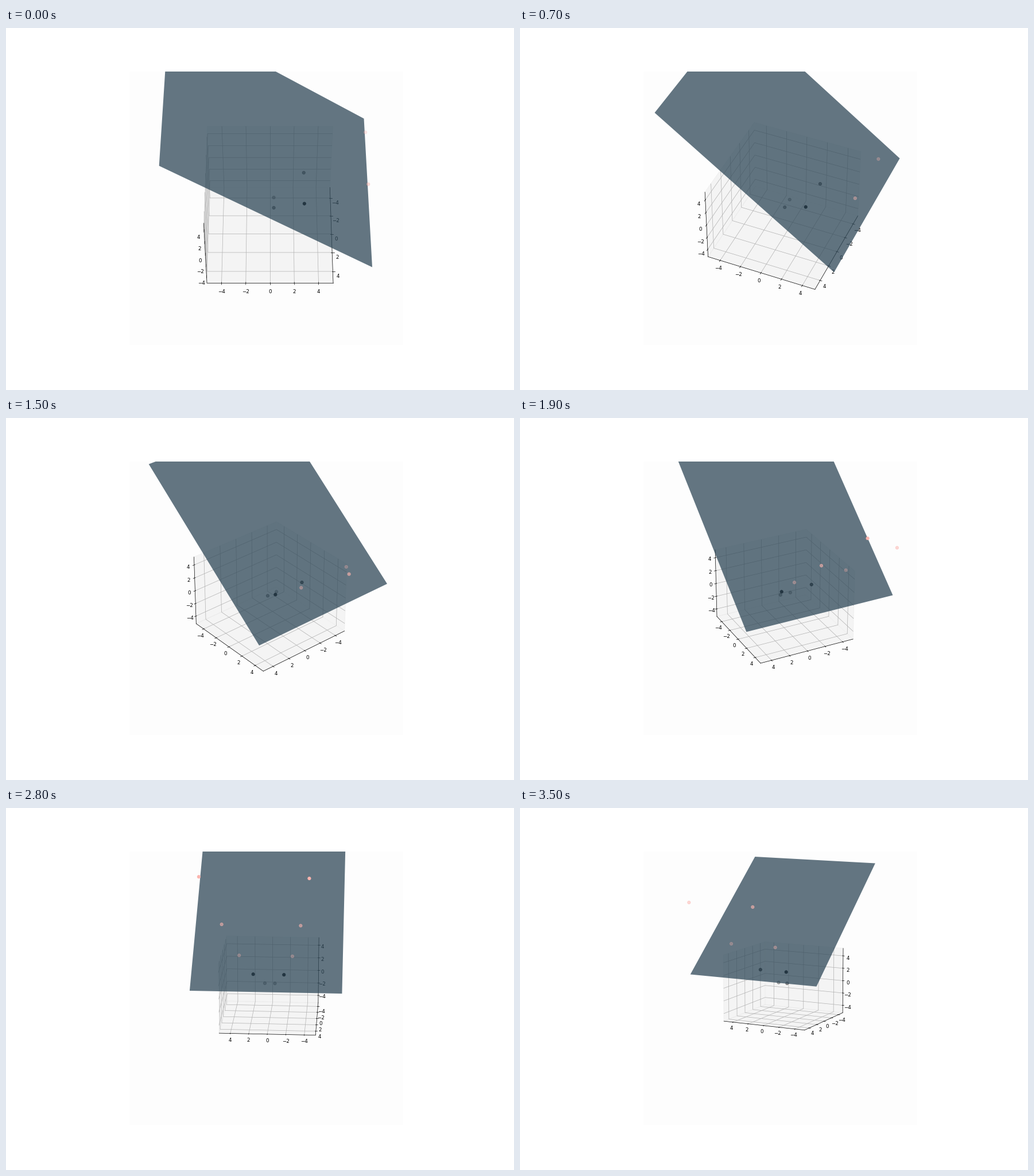
A matplotlib script for the animation above (3600 ms loop, 885x632 px).

```python
import numpy as np
import matplotlib.pyplot as plt
from matplotlib.animation import FuncAnimation

W, H, DPI = 885, 632, 63.2
FRAMES, INTERVAL = 36, 100
LIMIT = 5 * 25 / 24      # axis range of 5 plus a small margin
SPLIT = 10.494           # separating plane: y + z = SPLIT

plt.rcParams["font.family"] = "DejaVu Sans"

fig = plt.figure(figsize=((W + 0.01) / DPI, (H + 0.01) / DPI), dpi=DPI,
                 facecolor="white")
fig.subplots_adjust(left=0.125, right=0.9, bottom=0.125, top=0.88)
ax = fig.add_subplot(projection="3d", facecolor="#fdfdfd")

# One-dimensional samples lifted onto (x, x^2, x^2)
x = np.linspace(-5, 5, 10)
inner = np.abs(x) < 2
for mask, color in ((inner, "black"), (~inner, "#fcb4ae")):
    k = x[mask]
    ax.scatter(k, k**2, k**2, s=36, color=color)

gx, gy = np.meshgrid([-8, 8], [-8, 8])
ax.plot_surface(gx, gy, SPLIT - gy, color="#2f4858", alpha=0.75,
                shade=False, linewidth=0, rstride=1, cstride=1)

ax.set(xlim=(-LIMIT, LIMIT), ylim=(-LIMIT, LIMIT), zlim=(-LIMIT, LIMIT))
for axis in (ax.xaxis, ax.yaxis, ax.zaxis):
    axis.set_ticks(range(-4, 5, 2))
    axis.pane.set_facecolor((0.93, 0.93, 0.93, 0.1))
    axis.pane.set_edgecolor((0.9, 0.9, 0.9, 0.5))


def update(i):
    t = i / FRAMES
    ax.view_init(elev=50 - 40 * t, azim=120 * t)
    # Pull the camera back from 14 to 20 units
    ax.set_box_aspect((4, 4, 3), zoom=10 / (14 + 6 * t))
    return ()


anim = FuncAnimation(fig, update, frames=FRAMES, init_func=lambda: update(0),
                     interval=INTERVAL, repeat=True, repeat_delay=0)
plt.show()
```
